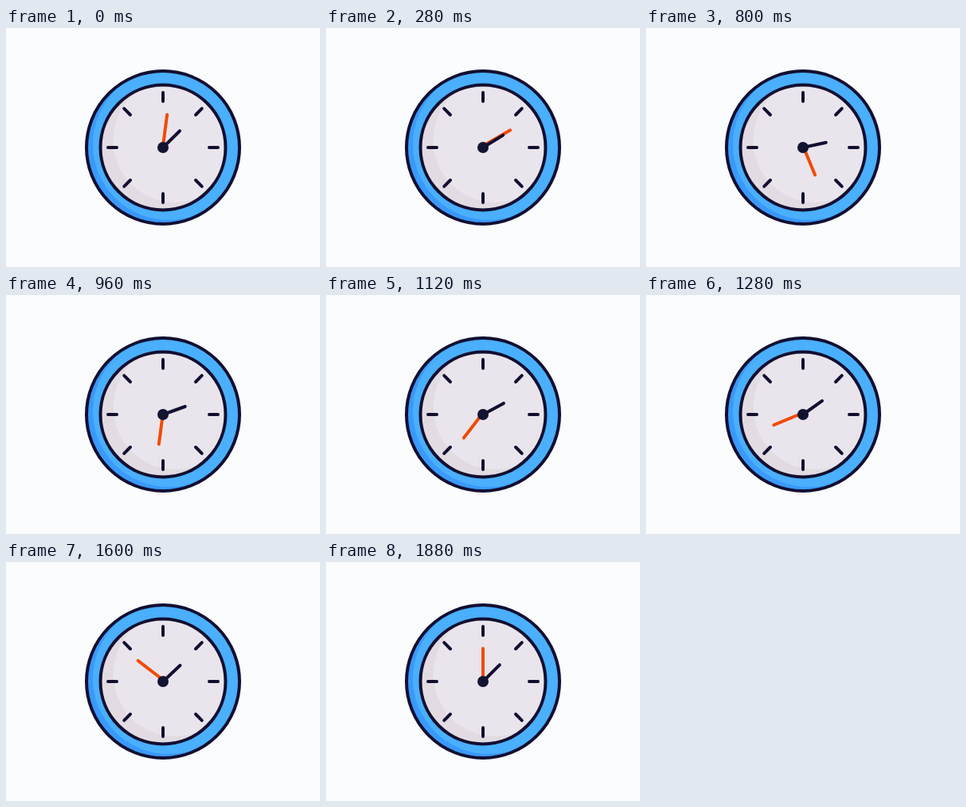
These frames come from a looping animation (394x300 px, 1.92 s). An HTML page:

```html
<!DOCTYPE html>
<html lang="en">
<head>
<meta charset="utf-8">
<title>Clock</title>
<style>
  html, body { margin: 0; width: 100%; height: 100%; overflow: hidden; background: #fbfcfe; }
  svg { display: block; width: 394px; height: 300px; }
  .line { fill: none; stroke: #120f31; stroke-width: 4; stroke-linecap: round; }
  .minute { stroke: #f14b06; }
</style>
</head>
<body>
<svg viewBox="0 0 394 300">
  <defs>
    <clipPath id="rimClip"><circle cx="197" cy="150" r="96"/></clipPath>
    <clipPath id="faceClip"><circle cx="197" cy="150" r="78.5"/></clipPath>
  </defs>
  <g clip-path="url(#rimClip)">
    <circle cx="197" cy="150" r="96" fill="#3a99fc"/>
    <circle cx="204" cy="146" r="95" fill="#4aaffd"/>
  </g>
  <g clip-path="url(#faceClip)">
    <circle cx="197" cy="150" r="78.5" fill="#e2dbe2"/>
    <circle cx="212.5" cy="141" r="78" fill="#eae5ec"/>
  </g>
  <circle class="line" cx="197" cy="150" r="96"/>
  <circle class="line" cx="197" cy="150" r="78.5"/>
  <g id="ticks"></g>
  <path id="minute" class="line minute" d="M197 148V108.5"/>
  <path id="hour" class="line" d="M197 150V120.5"/>
  <circle cx="197" cy="150" r="7" fill="#121431"/>
</svg>
<script>
  const LOOP = 1920, STEP = 40;
  const PEAK = 740, REST = 45, SWING = 34.5;
  const $ = id => document.getElementById(id);
  const turn = (el, deg, cy) => el.setAttribute('transform', `rotate(${deg} 197 ${cy})`);

  for (let i = 0; i < 8; i++) {
    const tick = document.createElementNS('http://www.w3.org/2000/svg', 'path');
    tick.setAttribute('class', 'line');
    tick.setAttribute('d', 'M197 81V92');
    turn(tick, i * 45, 150);
    $('ticks').append(tick);
  }

  const sineEase = u => (1 - Math.cos(Math.PI * u)) / 2;

  // Cubic bezier (x1, 0, x2, 1), solved by bisection
  function bezierEase(u, x1, x2) {
    let lo = 0, hi = 1, s = 0.5;
    for (let i = 0; i < 24; i++) {
      s = (lo + hi) / 2;
      const r = 1 - s;
      const x = 3 * r * r * s * x1 + 3 * r * s * s * x2 + s ** 3;
      if (x < u) lo = s; else hi = s;
    }
    return s * s * (3 - 2 * s);
  }

  function hourAngle(t) {
    const k = t < PEAK
      ? sineEase(t / PEAK)
      : 1 - bezierEase((t - PEAK) / (LOOP - PEAK), 0.22, 0.36);
    return REST + SWING * k;
  }

  const start = performance.now();
  function draw() {
    const elapsed = (performance.now() - start) % LOOP;
    const t = (Math.floor(elapsed / STEP) + 1) * STEP;
    turn($('minute'), t / LOOP * 360, 148);
    turn($('hour'), hourAngle(t), 150);
    requestAnimationFrame(draw);
  }
  draw();
</script>
</body>
</html>
```
